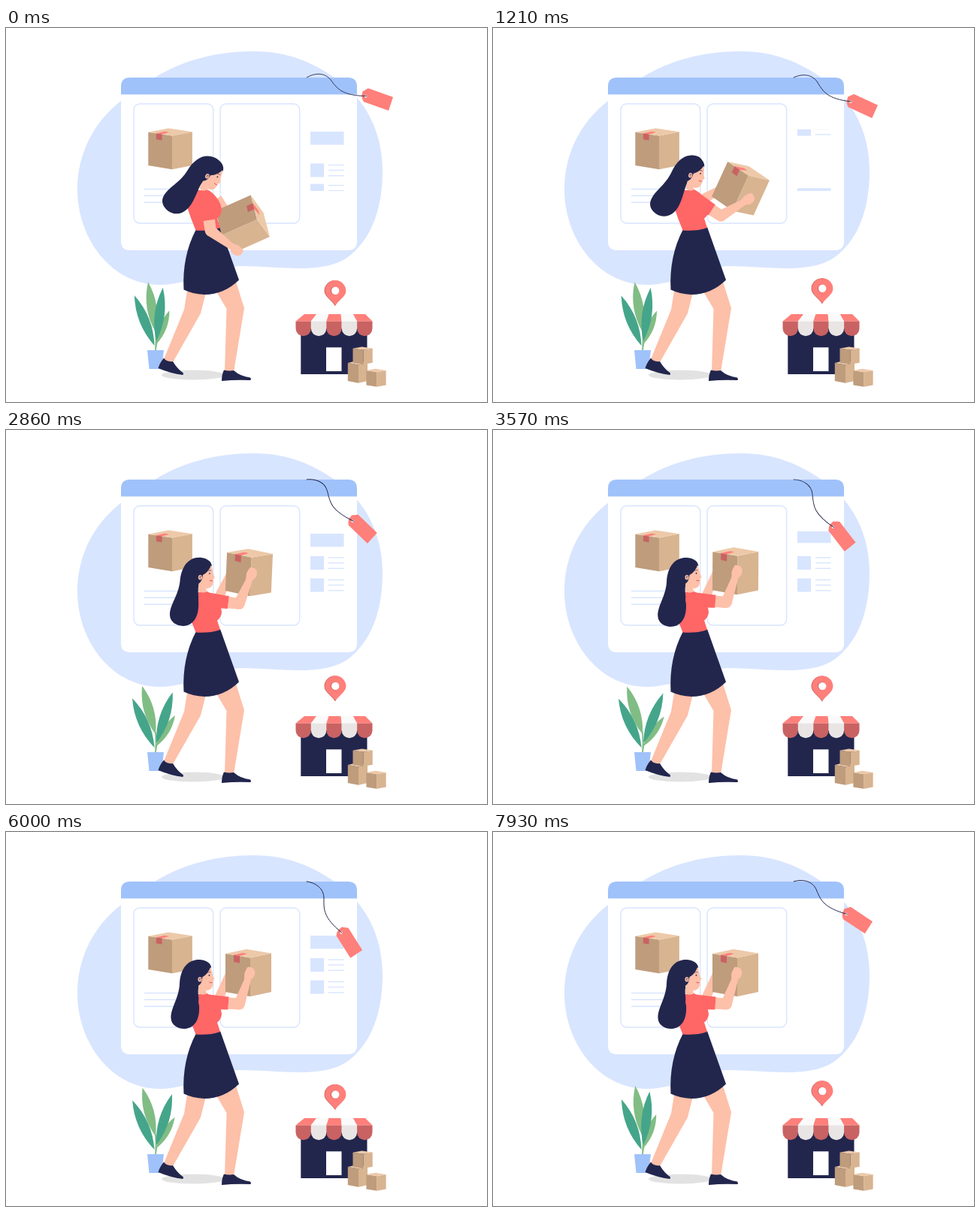
An HTML page with a canvas for the animation above (8000 ms loop, 640x498 px).

```html
<!DOCTYPE html>
<html lang="en">
<head>
<meta charset="utf-8">
<title>Online shop</title>
<style>
  html, body { margin: 0; width: 100%; height: 100%; overflow: hidden; background: #fff; }
  canvas { display: block; width: 640px; height: 498px; }
</style>
</head>
<body>
<canvas id="stage"></canvas>
<script>
const LOOP = 8000;
const PALE = '#d8e5ff', BLUE = '#a0c2fa', NAVY = '#22264d', SKIN = '#fdc0a9', SHIRT = '#ff6666';
const CORAL = '#ff7f7a', BRICK = '#c96262', MINT = '#80bd84', TEAL = '#45a58a';
const canvas = document.getElementById('stage');
const ctx = canvas.getContext('2d');
const ratio = window.devicePixelRatio || 1;
canvas.width = 640 * ratio;
canvas.height = 498 * ratio;

const rad = deg => deg * Math.PI / 180;
const clamp = x => Math.max(0, Math.min(1, x));
const ease = x => (1 - Math.cos(Math.PI * clamp(x))) / 2;
const mix = (a, b, k) => a + (b - a) * k;
const polar = ([x, y], r, deg) => [x + r * Math.cos(rad(deg)), y + r * Math.sin(rad(deg))];

function fill(color, path) {
  ctx.fillStyle = color;
  ctx.fill(new Path2D(path));
}
function line(color, width, path) {
  ctx.strokeStyle = color;
  ctx.lineWidth = width;
  ctx.stroke(new Path2D(path));
}
function rect(color, x, y, w, h) {
  ctx.fillStyle = color;
  ctx.fillRect(x, y, w, h);
}
function ellipse(color, x, y, rx, ry = rx, angle = 0) {
  ctx.fillStyle = color;
  ctx.beginPath();
  ctx.ellipse(x, y, rx, ry, angle, 0, 7);
  ctx.fill();
}
function placed(x, y, deg, draw, sx = 1, sy = 1) {
  ctx.save();
  ctx.translate(x, y);
  ctx.rotate(rad(deg));
  ctx.scale(sx, sy);
  draw();
  ctx.restore();
}
const spun = (x, y, deg, draw) =>
  placed(x, y, deg, () => { ctx.translate(-x, -y); draw(); });

// Tapered limb between two points
function limb(color, [ax, ay], [bx, by], wa, wb) {
  const d = Math.hypot(bx - ax, by - ay), nx = (ay - by) / d / 2, ny = (bx - ax) / d / 2;
  fill(color, `M${ax + nx * wa},${ay + ny * wa}L${bx + nx * wb},${by + ny * wb}` +
    `L${bx - nx * wb},${by - ny * wb}L${ax - nx * wa},${ay - ny * wa}Z`);
}

// Smooth curve through four poses, from box raised (0) to box low (1)
const KNOTS = [0, 0.16, 0.37, 1];
function pose(u, v) {
  const i = u < KNOTS[1] ? 0 : u < KNOTS[2] ? 1 : 2;
  const slope = j => {
    const a = Math.max(0, j - 1), b = Math.min(3, j + 1);
    return (v[b] - v[a]) / (KNOTS[b] - KNOTS[a]);
  };
  const h = KNOTS[i + 1] - KNOTS[i], s = (u - KNOTS[i]) / h, r = 1 - s;
  return v[i] * (1 + 2 * s) * r * r + v[i + 1] * (3 - 2 * s) * s * s +
    h * s * r * (slope(i) * r - slope(i + 1) * s);
}

// Origin is the front top corner
function box(tape) {
  fill('#be9c7c', 'M-33,-5.5L0,0V51.5L-33,45.5Z');
  fill('#d8b491', 'M0,0L28,-6V45.5L0,51.5Z');
  fill('#edc9a9', 'M-33,-5.5L-5,-11.5L28,-6L0,0Z');
  if (!tape) return;
  fill(CORAL, 'M-22,-3.7L-10,-6.6L-4,-5.6L-14,-2.3Z');
  fill(BRICK, 'M-22,-3.7L-14,-2.3V7L-22,5.4Z');
}

function background() {
  rect('#fff', 0, 0, 640, 498);
  fill(PALE, 'M330,31C375,31 410,47 437,66C480,95 501,140 501,190C501,235 489,272 467,294' +
    'C450,314 425,320 390,320C365,320 340,317 312,317C272,319 245,342 205,342' +
    'C140,342 95,280 95,215C95,167 117,125 153,97C168,84 181,75 198,66C235,43 280,31 330,31Z');
  fill('#fff', 'M153,80H467V284Q467,296 455,296H165Q153,296 153,284Z');
  fill(BLUE, 'M153,88.5V78Q153,66 165,66H455Q467,66 467,78V88.5Z');
  for (const x of [170, 285]) {
    ctx.strokeStyle = PALE;
    ctx.lineWidth = 1.4;
    ctx.beginPath();
    ctx.roundRect(x, 101, 105.7, 159, 8);
    ctx.stroke();
  }
  line(PALE, 1.4, 'M184,214.5H240M184,223.3H240M184,232.3H240');
  placed(221, 143.5, 0, () => box(true), 0.96, 0.87);
}

function sidebar(t) {
  const TOP = 135, BOTTOM = 217, MOVE = 800;
  const exits = [170, 3306, 6450], enters = [1100, 4236];
  const items = [[138, 17.5, 0], [168, 18, 270], [197.5, 18, 410]];
  ctx.save();
  ctx.beginPath();
  ctx.rect(400, TOP, 60, BOTTOM - TOP);
  ctx.clip();
  items.forEach(([rest, height, delay], i) => {
    const piece = y => {
      rect(PALE, 405, y, i ? 18 : 44.5, height);
      if (i) for (const d of [2, 9, 16.3]) rect(PALE, 429, y + d - 0.7, 20.5, 1.4);
    };
    const local = t - delay;
    exits.forEach((exit, n) => {
      const from = n ? enters[n - 1] : -MOVE;
      if (local < from || local > exit + MOVE) return;
      piece(local < exit
        ? mix(BOTTOM, rest, ease((local - from) / MOVE))
        : mix(rest, TOP - height, ease((local - exit) / MOVE)));
    });
  });
  ctx.restore();
}

function priceTag(t) {
  const swing = 41.5 * (t < 5145 ? ease(t / 5145) : 1 - ease((t - 5145) / 4620));
  spun(400, 65.5, swing, () => {
    fill(CORAL, 'M482,80.2L515,92L509,110L476,98.3Q473,94 473.3,90L474.5,84.5Z');
    ellipse('#fff', 478.7, 91, 1.7);
    line(NAVY, 0.9, 'M400,66C411,59.5 424,59 432,69C441,81 447,90 480,90.7');
  });
}

function plant(t) {
  const sway = (1 + Math.cos(Math.PI * (t - 4380) / 3900)) / 2;
  const leaf = (color, x0, y0, x1, y1, tipX, tipY, width) => {
    const x = mix(x1, tipX, sway), y = mix(y1, tipY, sway);
    const dx = x - x0, dy = y - y0, d = Math.hypot(dx, dy);
    const nx = -dy / d * width, ny = dx / d * width, mx = x0 + dx * 0.5, my = y0 + dy * 0.5;
    fill(color, `M${x0},${y0}Q${mx + nx},${my + ny} ${x},${y}Q${mx - nx},${my - ny} ${x0},${y0}`);
  };
  leaf(MINT, 200, 421, 217, 376, 229, 382, 9.5);
  leaf(TEAL, 197.5, 423, 171, 356, 166.5, 358, 13);
  leaf(MINT, 199, 405, 189.5, 338, 177, 342, 13);
  line(MINT, 1.7, 'M199,430Q200,416 199,402');
  leaf(TEAL, 200, 417, 208, 345.5, 228.5, 351, 13);
  line(MINT, 1.4, 'M199,430L201,417');
  fill(BLUE, 'M188,429H210L207,454H190.5Z');
}

function shop(t) {
  rect(NAVY, 392.3, 400, 88.2, 61);
  rect('#fff', 426, 425.3, 20.5, 31.7);
  for (let i = 0; i < 5; i++) {
    const a = 385.5 + i * 20.4, b = a + 20.4, top = 397 + i * 16.2;
    fill(i % 2 ? '#fafafa' : CORAL, `M${top},381h16.2L${b},390.5H${a}Z`);
    fill(i % 2 ? '#e9e5e5' : BRICK, `M${a},390.5H${b}V400A10.2,10.2 0 0 1 ${a},400Z`);
  }
  placed(469, 448.5, 0, () => box(), 0.43, 0.47);
  placed(475.7, 428.8, 0, () => box(), 0.43, 0.37);
  placed(493.6, 458.2, 0, () => box(), 0.43, 0.38);

  const pin = 'M0,0C-2,-6 -14,-12 -14,-20A14,14 0 0 1 14,-20C14,-12 2,-6 0,0Z';
  placed(438, 365.6 + 4.5 * Math.cos(2 * Math.PI * t / 6300), 0, () => {
    placed(-0.5, 0, 0, () => fill(BRICK, pin));
    placed(0.4, 0, 0, () => fill(CORAL, pin));
    ellipse(BRICK, -0.5, -20.4, 5.5);
    ellipse('#fff', 0.2, -20.4, 5.2);
  });
}

function lowerBody() {
  ellipse('#e2e2e2', 249, 462, 42, 6.5);
  fill(SKIN, 'M241,350L237,375L210,441Q214,447 222,445L259,380L266,352Z');
  fill(SKIN, 'M280,351L293.5,374L291,457Q297,460 303,458L317,373L306,338Z');
  fill(NAVY, 'M210,439.5Q214,445 222,444Q228,454 236,459.5L235.5,462Q219,460 202.5,453Q205,445 210,439.5Z');
  fill(NAVY, 'M290,455.5Q296,457 303,456Q312,464 325,465.5Q327,468 325,469Q306,468 287,470Q287,461 290,455.5Z');
  fill(NAVY, 'M253,268Q270,271 285,265L310,335.5Q290,355 264,355Q248,354 236.5,348.5Q234,304 253,268Z');
}

function head(u) {
  const dx = 2 * u, dy = u;
  const turned = (deg, draw) => placed(dx, dy, 0, () => spun(262, 212, deg, draw));
  turned(pose(u, [0, 11, 22, 28.6]), () => fill(NAVY,
    'M257,170C240,170 232,184 231,202C230,222 219,234 219.5,248C220,258 230,262.5 238,262' +
    'C252,261 258,248 257,232C257,220 254,212 257,204L268,184Q266,171 257,170Z'));
  turned(pose(u, [0, 5.5, 14, 28]), () => {
    fill(SKIN, 'M262,184L272.5,180Q274.5,186 275,191L277.5,196L275.5,198Q276,204 273.5,208' +
      'Q270,212 266,210.5L267,215.5Q262,218 256,215L256,199Z');
    fill(NAVY, 'M273.3,181.5C273,174 265,170 257,170C243,170 237,184 238,205H255.5' +
      'Q261,202 261.5,193Q269,189 272,180Z');
    ellipse(SKIN, 258, 196.3, 2.6, 3.3);
    line(NAVY, 0.6, 'M259,198Q256.5,197.5 257.5,195Q259,194 259.5,196');
    ellipse(NAVY, 270.4, 190.8, 0.8, 1.1);
    line(NAVY, 0.6, 'M268.5,187.3Q270.5,185.8 272.5,187');
    line('#d9474f', 0.9, 'M270.5,200Q272.5,201.3 274.5,200.3');
  });
}

function woman(t) {
  const u = Math.pow(clamp(1 - t / 4300), 3);
  const shoulder = [266, 226], armAngle = 4 + 78 * u, foreAngle = -71 + 108 * u;
  const elbow = polar(shoulder, 44.5, armAngle);
  const cuff = polar(shoulder, 30, armAngle);
  const hand = polar(elbow, 43, foreAngle);
  const wrist = polar(elbow, 36, foreAngle);

  lowerBody();
  const farHand = [pose(u, [298, 302, 306, 300]), pose(u, [187, 202, 213, 255])];
  limb(SKIN, [281, 227], farHand, 13, 10);
  placed(pose(u, [325, 332.5, 340, 334]), pose(u, [167.5, 178, 196.5, 255]), 66 * u, () => box(true));

  fill(SHIRT, 'M254,215.5Q261,217 267,214.5C278,220 287,233 287,243Q286,250 281,253.5' +
    'L285,266Q270,271 252.5,269.5Q246,254 240.5,237Z');
  head(u);

  limb(SKIN, cuff, elbow, 15.5, 15);
  ellipse(SKIN, ...elbow, 7.5);
  limb(SKIN, elbow, wrist, 15, 8.5);
  placed(...hand, foreAngle, () => {
    ellipse(SKIN, 0, 0, 8.5, 6.8);
    fill(SKIN, 'M-10,-4.3L-3,-6.5L6,-6Q10,-4 7,-1L-10,4.3Z');
  });
  ellipse(SHIRT, ...shoulder, 10);
  limb(SHIRT, shoulder, cuff, 20, 17);
}

function frame(now) {
  const t = now % LOOP;
  ctx.setTransform(ratio, 0, 0, ratio, 0, 0);
  background();
  sidebar(t);
  priceTag(t);
  plant(t);
  shop(t);
  woman(t);
  requestAnimationFrame(frame);
}
frame(0);
</script>
</body>
</html>
```
